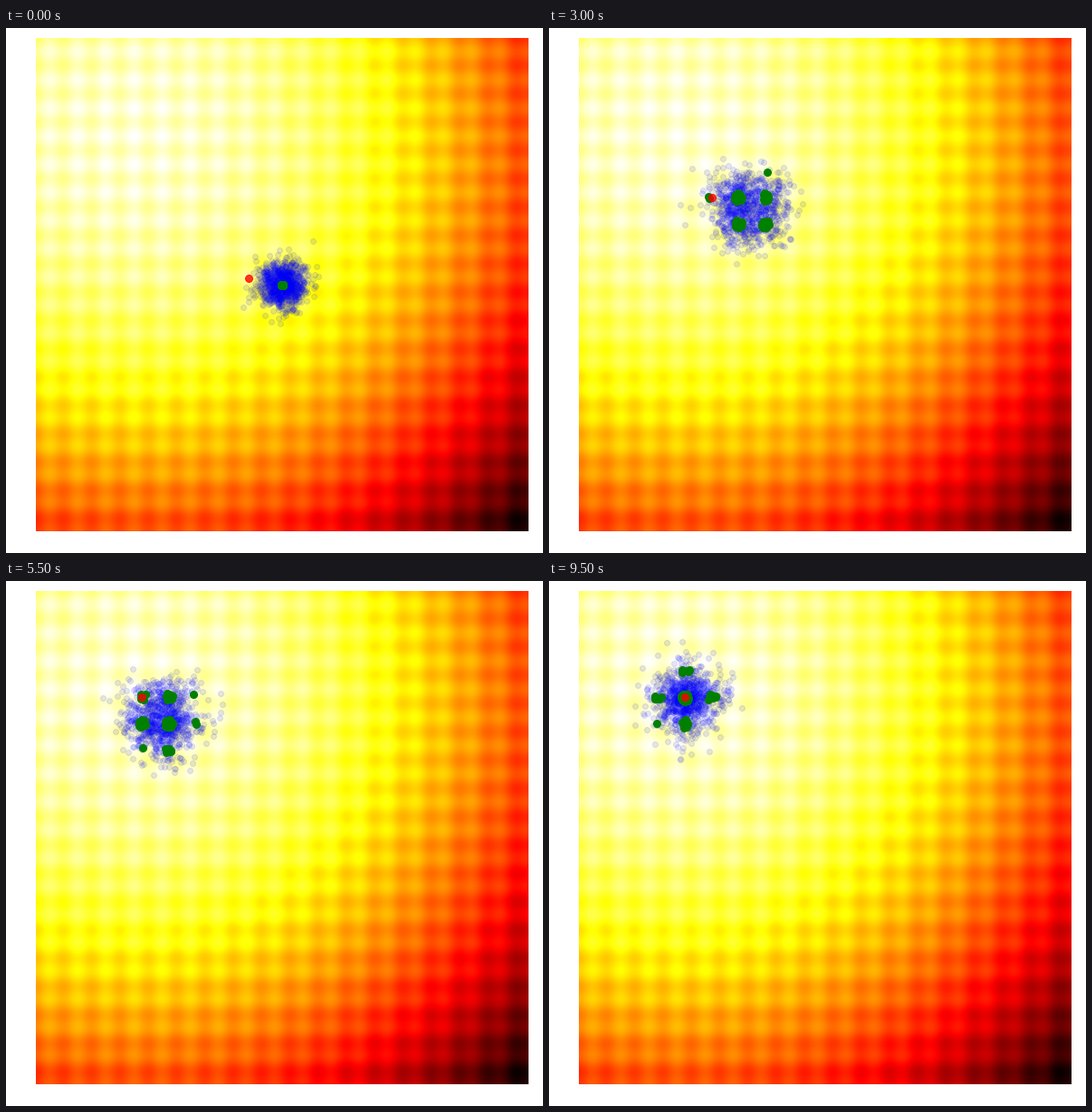
These frames come from a looping animation (593x579 px, 10000 ms). A matplotlib script:

```python
import numpy as np
import matplotlib.pyplot as plt
from matplotlib.animation import FuncAnimation

W, H, DPI = 593, 579, 64
FRAMES, INTERVAL = 20, 500
LEFT, TOP, SIDE = 33, 11, 544
START = np.array([305.0, 283.5])
PEAK, UNIT = np.array([150.2, 128.2]), 29.3          # search space
BG_PEAK, BG_UNIT = np.array([141.4, 119.4]), 31.15   # painted landscape
POP, ELITE, SIGMA = 1000, 100, 13.2

# Best solution so far: key steps and places.
LEAD_STEPS = [0, 3, 6, 8, 11]
LEAD_X = [269.5, 235.5, 181.5, 178.5, 150]
LEAD_Y = [279.5, 190.5, 187.5, 157.5, 128.5]


def landscape():
    """Negated Rastrigin function over the plot area."""
    axis = np.arange(SIDE) + 0.5
    x, y = np.meshgrid(LEFT + axis, TOP + axis)
    u = (np.dstack([x, y]) - BG_PEAK) / BG_UNIT
    return -np.sum(10 + u ** 2 - 10 * np.cos(2 * np.pi * u), axis=-1)


def snap(points):
    """Nearest local optimum of the search space."""
    return PEAK + UNIT * np.round((points - PEAK) / UNIT)


def disk(radius, count, rng):
    r = radius * np.sqrt(rng.random(count))
    angle = rng.uniform(0, 2 * np.pi, count)
    return np.column_stack([r * np.cos(angle), r * np.sin(angle)])


def elite(step, rng):
    """Parents gather on optima around a centre that settles on the peak."""
    if step == 0:
        return START + disk(0.8, ELITE, rng)
    centre = PEAK + (START - PEAK) * np.exp(-(step / 7) ** 1.4)
    return (snap(centre + rng.normal(0, 11, (ELITE, 2)))
            + disk(4.7, ELITE, rng))


def breed(parents, rng):
    """Each child takes every coordinate from one of two parents, plus noise."""
    a, b = (parents[rng.integers(ELITE, size=POP)] for _ in range(2))
    children = np.where(rng.random((POP, 2)) < 0.5, a, b)
    return children + rng.normal(0, SIGMA, (POP, 2))


def lead(step):
    """The best point, which jumps from optimum to optimum between key steps."""
    point = np.array([np.interp(step, LEAD_STEPS, xy)
                      for xy in (LEAD_X, LEAD_Y)])
    return point + 0.7 * (snap(point) - point)


def generation(step):
    rng = np.random.default_rng(step + 40)
    parents = elite(step, rng)
    return breed(parents, rng), parents, lead(step)


def dots(color, diameter, alpha):
    pt = 72 / DPI
    return ax.scatter([], [], s=(diameter * pt) ** 2, c=color, alpha=alpha,
                      linewidths=pt, edgecolors="face")


fig = plt.figure(figsize=(W / DPI, H / DPI), dpi=DPI, facecolor="white")
ax = fig.add_axes([0, 0, 1, 1])
ax.imshow(landscape(), cmap="hot", interpolation="nearest", aspect="auto",
          extent=(LEFT, LEFT + SIDE, TOP + SIDE, TOP))
ax.set_xlim(0, W)
ax.set_ylim(H, 0)
ax.axis("off")

layers = [dots("blue", 6, 0.1), dots("green", 8, 1), dots("red", 8, 0.8)]


def update(step):
    for layer, points in zip(layers, generation(step)):
        layer.set_offsets(points)
    return layers


anim = FuncAnimation(fig, update, frames=FRAMES, interval=INTERVAL,
                     repeat=True, repeat_delay=0)
plt.show()
```
